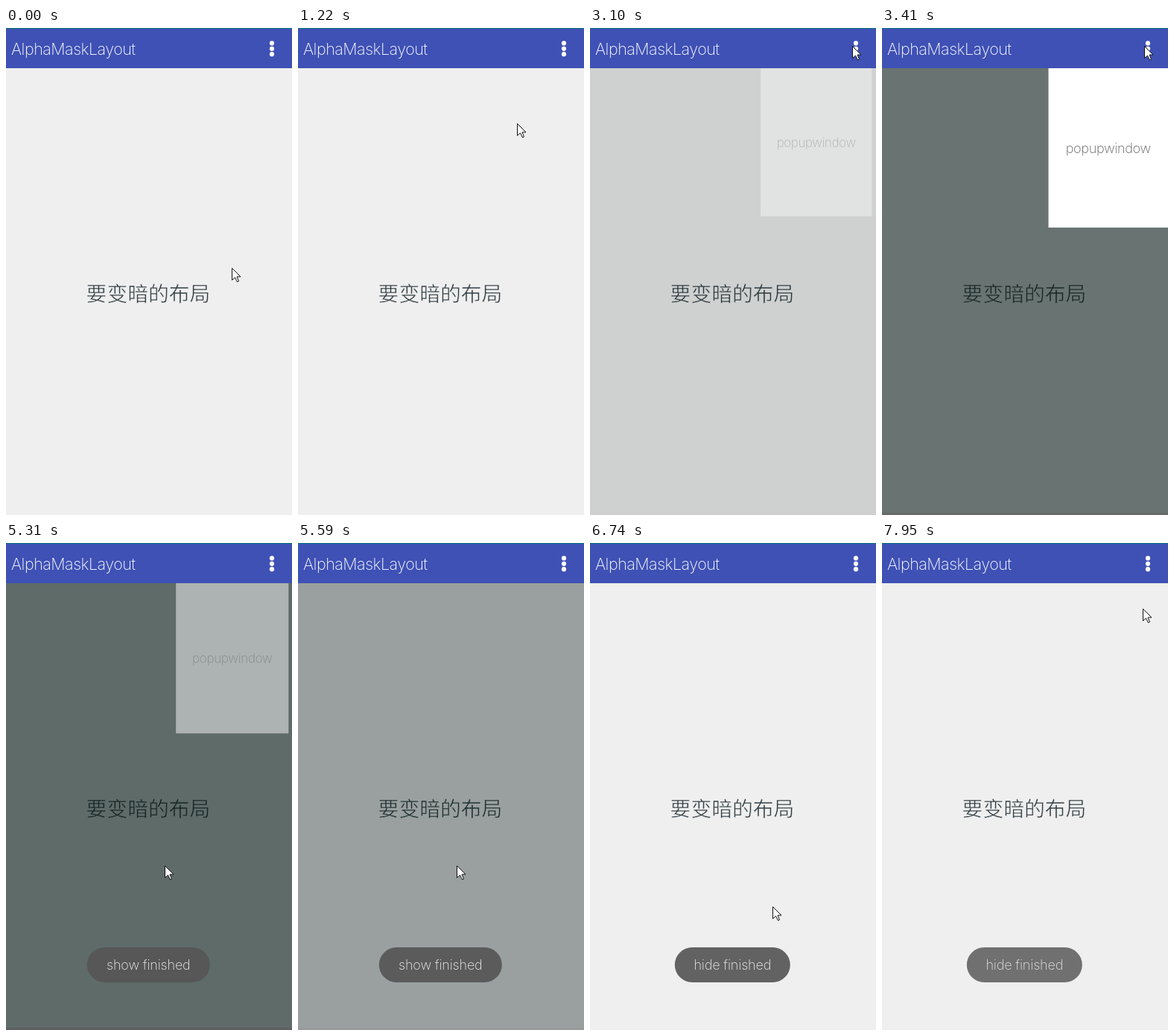
Animation of 384x654 px, one loop 8000 ms. Source, as an HTML page with a canvas:

```html
<!DOCTYPE html>
<html lang="zh-CN">
<head>
<meta charset="utf-8">
<title>AlphaMaskLayout</title>
<style>
html, body { margin: 0; width: 100%; height: 100%; overflow: hidden; background: #efefef; }
canvas { display: block; }
</style>
</head>
<body>
<canvas id="stage" width="384" height="654"></canvas>
<script>
const W = 384, H = 654, LOOP = 8000, BAR = 54, TICK = 130;
const PAPER = '#efefef';
const LATIN = 'Inter, "Liberation Sans", sans-serif';
const CJK = '"Noto Sans CJK SC", "Noto Sans CJK", sans-serif';
const ctx = document.getElementById('stage').getContext('2d');

// Spans in which the screen refreshes, about once per TICK; it holds still between them.
const ACTIVE = [
  [120, 280], [680, 1640], [1770, 2310], [3100, 4140],
  [4260, 4570], [5310, 6340], [6620, 7250], [7530, 7950]
];

// Pointer strokes; bow bends the path sideways.
const REST = { x: 303, y: 322 };
const STROKES = [
  { from: 0, to: 280, x: 282, y: 295, bow: 0 },
  { from: 540, to: 1640, x: 337, y: 54, bow: -32 },
  { from: 1640, to: 2310, x: 352, y: 24, bow: 0 },
  { from: 4030, to: 4570, x: 213, y: 433, bow: -45 },
  { from: 6500, to: 7250, x: 345, y: 660, bow: 0 },
  { from: 7400, to: 7950, x: 350, y: 88, bow: 0 }
];

const ramp = (t, start, length) => Math.min(1, Math.max(0, (t - start) / length));
const ease = p => 0.5 - Math.cos(p * Math.PI) / 2;
const accelerate = p => p * p;
const decelerate = p => 1 - (1 - p) ** 2;

function lastRefresh(t) {
  let shown = 0;
  for (const [start, end] of ACTIVE) {
    if (t < start) break;
    const gaps = Math.round((end - start) / TICK), gap = (end - start) / gaps;
    shown = start + gap * Math.min(gaps, Math.floor((t - start) / gap + 0.1));
  }
  return shown;
}

function rect(x, y, w, h, color) {
  ctx.fillStyle = color;
  ctx.fillRect(x, y, w, h);
}

function label(str, x, y, size, color, spacing, align = 'center') {
  ctx.font = `200 ${size}px ${LATIN}`;
  ctx.fillStyle = color;
  ctx.textAlign = align;
  ctx.letterSpacing = spacing + 'px';
  ctx.fillText(str, x, y);
}

function drawContent() {
  rect(0, 0, W, H, PAPER);
  ctx.font = '300 27.8px ' + CJK;
  ctx.textAlign = 'center';
  ctx.letterSpacing = '0px';
  ctx.fillStyle = '#2f3b40';
  ctx.fillText('要变暗的布局', 191, 367);
  // A paper-coloured outline slims the strokes to a light weight.
  ctx.strokeStyle = PAPER;
  ctx.lineWidth = 0.6;
  ctx.strokeText('要变暗的布局', 191, 367);
}

function drawBar() {
  rect(0, 0, W, BAR, '#3f51b5');
  rect(0, 0, W, 1, '#087482');
  label('AlphaMaskLayout', 7, 36, 21.5, '#fff', -0.5, 'left');
  ctx.fillStyle = '#fff';
  for (let i = -1; i <= 1; i++) {
    ctx.beginPath();
    ctx.arc(357, 27.8 + i * 7.4, 3.1, 0, Math.PI * 2);
    ctx.fill();
  }
}

function drawMask(t) {
  const a = 0.6 * (ease(ramp(t, 2945, 500)) - ease(ramp(t, 5369, 455)));
  if (a <= 0) return;
  rect(0, BAR, W, H - BAR - 3, `rgba(0,20,17,${a})`);
  rect(0, H - 3, W, 3, `rgba(0,0,0,${a})`);
}

function drawPopup(t) {
  const p = decelerate(ramp(t, 3050, 300)) - accelerate(ramp(t, 5082, 300));
  if (p <= 0) return;
  const s = 0.9 + 0.1 * p;
  ctx.save();
  ctx.globalAlpha = p ** 0.85;
  ctx.translate(303.75, BAR);
  ctx.scale(s, s);
  rect(-80.25, 0, 160.5, 214, '#fff');
  label('popupwindow', 0, 114, 18, '#606060', -0.3);
  ctx.restore();
}

function drawToast(str, width, t, shown, fading) {
  const a = 0.91 * (ramp(t, shown, 260) - ramp(t, fading, 480));
  if (a <= 0) return;
  ctx.save();
  ctx.globalAlpha = a;
  ctx.fillStyle = '#555';
  ctx.beginPath();
  ctx.roundRect(191.3 - width / 2, 543, width, 47, 23.5);
  ctx.fill();
  label(str, 191.3, 573, 18, '#fff', -0.15);
  ctx.restore();
}

function pointerAt(t) {
  let { x, y } = REST;
  for (const s of STROKES) {
    const p = ease(ramp(t, s.from, s.to - s.from));
    x += (s.x - x) * p + s.bow * Math.sin(p * Math.PI);
    y += (s.y - y) * p;
  }
  return [Math.round(x), Math.round(y)];
}

function drawPointer(x, y) {
  ctx.save();
  ctx.translate(x + 0.5, y + 0.5);
  ctx.beginPath();
  [[0, 0], [0, 16], [4, 12.5], [7, 18.5], [9, 17.5], [6.5, 11.5], [11.5, 11.5]]
    .forEach(p => ctx.lineTo(...p));
  ctx.closePath();
  ctx.fillStyle = '#fff';
  ctx.fill();
  ctx.strokeStyle = '#111';
  ctx.lineWidth = 1;
  ctx.stroke();
  ctx.restore();
}

function draw(t) {
  drawContent();
  drawMask(t);
  drawBar();
  drawPopup(t);
  drawToast('show finished', 165, t, 3500, 5596);
  drawToast('hide finished', 155, t, 6080, 7905);
  drawPointer(...pointerAt(t));
}

function frame() {
  draw(lastRefresh(performance.now() % LOOP));
  requestAnimationFrame(frame);
}
frame();
</script>
</body>
</html>
```
